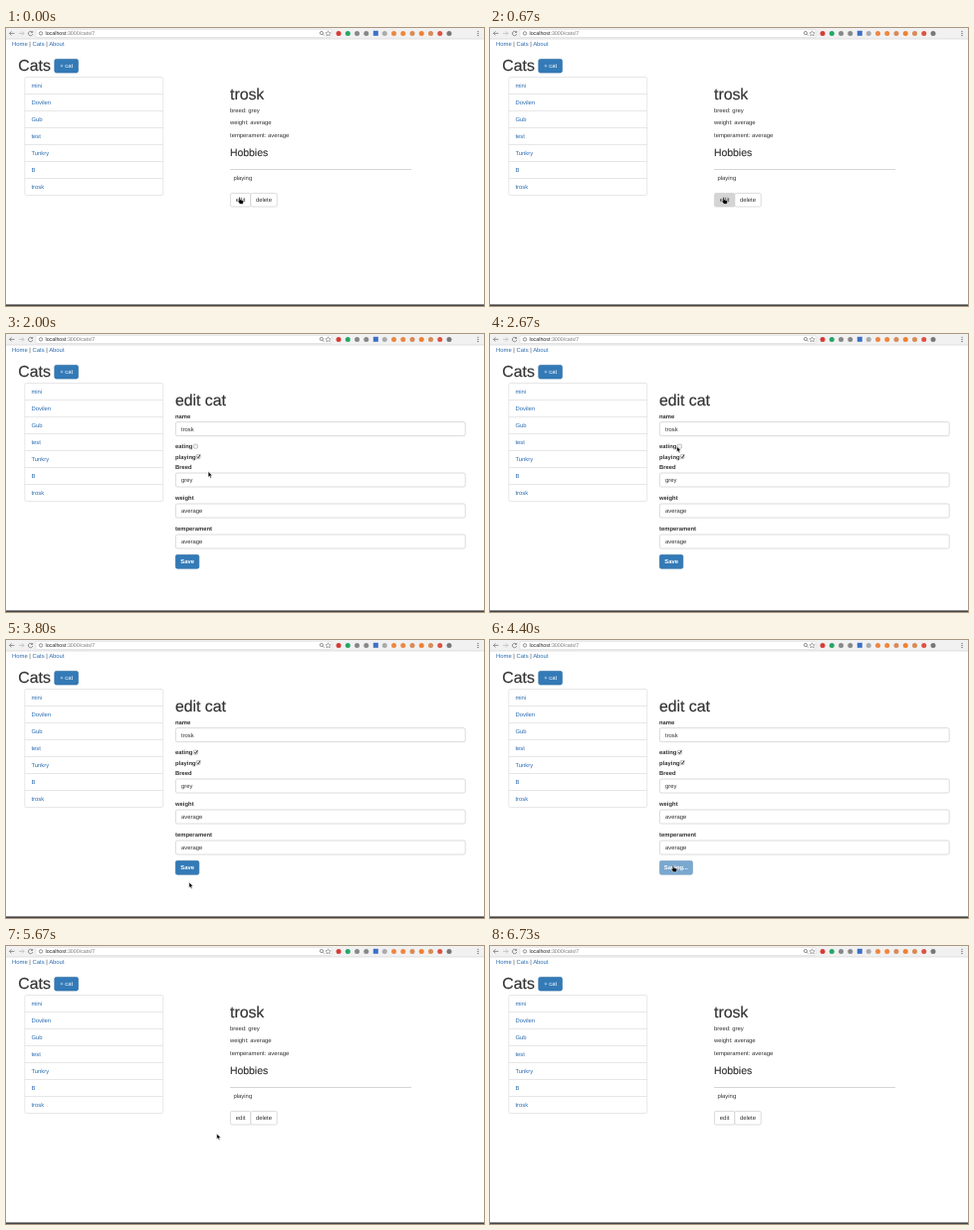
An HTML page for the animation above (6990 ms loop, 480 px wide and 280 px high).

```html
<!DOCTYPE html>
<html lang="en">
<head>
<meta charset="utf-8">
<title>Cats</title>
<style>
  html, body { margin: 0; width: 100%; height: 100%; overflow: hidden; background: #fff; }
  svg { display: block; width: 100%; height: 100%; }
  text { font: 5.9px "Liberation Sans", Arial, sans-serif; fill: #333; text-rendering: geometricPrecision; white-space: pre; }
  .link { fill: #2b6cb0; }
  .bold { font-weight: bold; }
  .white { fill: #fff; }
  .mid { text-anchor: middle; }
  .h1 { font-size: 15.8px; stroke: #333; stroke-width: .2; }
  .h3 { font-size: 10.4px; stroke: #333; stroke-width: .15; }
  .url { font-size: 5.3px; fill: #777; }
  .line { fill: none; stroke: #777; stroke-width: .8; }
</style>
</head>
<body>
<svg id="stage" viewBox="0 0 480 280"></svg>
<script>
const TICK = 1000 / 15, LOOP = 6990;
const cats = ['mini', 'Dovilen', 'Gub', 'test', 'Tunkry', 'B', 'trosk'];
const hero = cats[6];

const text = (x, y, s, cls = '', id = '') => `<text x="${x}" y="${y}" class="${cls}" id="${id}">${s}</text>`;
const rect = (x, y, w, h, fill, stroke = 'none', r = 0, id = '') =>
  `<rect x="${x}" y="${y}" width="${w}" height="${h}" rx="${r}" fill="${fill}" stroke="${stroke}" stroke-width=".7" id="${id}"/>`;
const dot = (x, y, r, fill) => `<circle cx="${x}" cy="${y}" r="${r}" fill="${fill}"/>`;
const path = (d, attrs = 'class="line"') => `<path d="${d}" ${attrs}/>`;
const group = (id, ...parts) => `<g id="${id}">${parts.join('')}</g>`;

const button = (x, y, w, h, label, cls, fill, stroke, id = '') =>
  rect(x, y, w, h, fill, stroke, 1.7, id) + text(x + w / 2, y + h / 2 + 2.1, label, 'mid ' + cls, id && id + 'Text');
const field = (label, value, y) =>
  text(170, y - 3.9, label, 'bold') + rect(170.4, y, 290.8, 14, '#fff', '#ccc', 1.7) + text(176, y + 9.2, value);
const tick = (x, y, id) => path(`M${x + 1} ${y + 2}l1 1.2 2-3.2`, `fill="none" stroke="#222" stroke-width=".9" id="${id}"`);
const check = (label, x, y, id) =>
  text(170, y + 4, label, 'bold') + rect(x, y, 4, 4, '#f4f4f4', '#aaa', .8) + tick(x, y, id);

const extensions = ['#d93a35', '#27a567', '#888', '#888', '#3d6fc4', '#aaa', '#ee8640',
  '#ee8640', '#d98a55', '#f08030', '#d98a55', '#e05040', '#777'];
const chrome = group('chrome',
  rect(0, 0, 480, 11, '#f1f1f1'),
  rect(30, 1.3, 297, 8.2, '#fff', '#ddd', 1),
  rect(0, 10.7, 480, .6, '#ccc'),
  path('M8.5 5.4h-5m2-2l-2 2 2 2'),
  path('M13 5.4h5m-2-2l2 2-2 2', 'fill="none" stroke="#bbb" stroke-width=".8"'),
  path('M26.4 4.2a2.2 2.2 0 1 0 .4 1.8m-.2-3v1.5h-1.5'),
  `<circle cx="35" cy="5.4" r="1.7" class="line"/>`,
  text(39.5, 7.3, '<tspan fill="#222">localhost</tspan>:3000/cats/7', 'url'),
  `<circle cx="316.8" cy="5" r="1.6" class="line"/>`, path('M318 6.2l1.5 1.5'),
  path('M323.5 2.8l.8 1.8 1.8.2-1.3 1.2.4 1.9-1.7-1-1.7 1 .4-1.9-1.3-1.2 1.8-.2z', 'fill="none" stroke="#777" stroke-width=".6"'),
  ...extensions.map((c, i) => i === 4 ? rect(368.8, 2.8, 5, 5, c) : dot(334 + i * 9.25, 5.4, 2.5, c)),
  ...[3.3, 5.4, 7.5].map(y => dot(474, y, .65, '#666')));

const list = group('list',
  text(6, 18, '<tspan class="link">Home</tspan> | <tspan class="link">Cats</tspan> | <tspan class="link">About</tspan>'),
  text(12.3, 42.5, 'Cats', 'h1'),
  button(48.8, 31.4, 23.6, 13.6, '+ cat', 'white', '#337ab7', '#2e6da4'),
  rect(18.8, 49.5, 139, 119, '#fff', '#ddd', 1.7),
  ...cats.map((name, i) =>
    (i ? rect(18.8, 49.2 + i * 17, 139, .7, '#ddd') : '') + text(25.4, 60.3 + i * 16.95, name, 'link')));

const show = group('show',
  text(225, 71.8, hero, 'h1'),
  text(225, 84.8, 'breed: grey'),
  text(225, 97.3, 'weight: average'),
  text(225, 109.5, 'temperament: average'),
  text(225, 129, 'Hobbies', 'h3'),
  rect(225, 142, 182, .8, '#ccc'),
  text(228.5, 152.5, 'playing'),
  button(225.4, 166.4, 20.4, 13.6, 'edit', '', '#fff', '#ccc', 'edit'),
  button(245.8, 166.4, 26.4, 13.6, 'delete', '', '#fff', '#ccc'));

const form = group('form',
  text(170, 71.8, 'edit cat', 'h1'),
  field('name', hero, 88.6),
  check('eating', 188.4, 111.2, 'eating'),
  check('playing', 191, 121.6, 'playing'),
  field('Breed', 'grey', 140),
  field('weight', 'average', 171),
  field('temperament', 'average', 202),
  button(170.4, 222.4, 23.4, 13.8, 'Save', 'white bold', '#337ab7', '#2e6da4', 'save'));

const outline = 'stroke="#fff" stroke-width=".5" fill="#000"';
const cursor = group('cursor',
  path('M0 0v5.6l1.3-1.1 1 2.1 1-.5-1-2h1.8z', outline + ' id="arrow"'),
  path('M-.6 0q.8-.6 1.2.2l.4 2.3 2.6.7q.6.3.4 1.2l-.5 2.4h-3.2l-2.2-3q.2-.9 1.3 0z', outline + ' id="hand"'),
  path('M-1.1-3.2q1.1 0 1.1.7v5q0 .7-1.1.7M1.1-3.2q-1.1 0-1.1.7v5q0 .7 1.1.7', 'fill="none" stroke="#333" stroke-width=".6" id="beam"'));

const $ = id => document.getElementById(id);
$('stage').innerHTML = rect(0, 0, 480, 280, '#fff') + chrome + list + show + form +
  rect(0, 278.4, 480, 1.6, '#444') + cursor;

// time, x, y of the pointer
const moves = [
  [0, 234.5, 170.5], [999, 234.5, 170.5], [1000, 235, 175], [1533, 235, 175],
  [2267, 189.5, 123], [2667, 187.6, 113.2], [3000, 187.8, 113], [3400, 187.8, 113],
  [3800, 183.8, 244], [4067, 183.8, 227], [4933, 183.8, 227], [5533, 211.6, 189],
  [5667, 211.6, 189], [6133, 160, 95], [6200, 160, 95], [6467, 228, 18.5],
  [6600, 228, 18.5], [6667, 228, 12], [LOOP, 228, 12]];

function pointer(t) {
  const i = moves.findIndex(m => m[0] > t);
  const [a, b] = [moves[i - 1], moves[i]];
  const k = (t - a[0]) / (b[0] - a[0]), e = k * k * (3 - 2 * k);
  return [a[1] + (b[1] - a[1]) * e, a[2] + (b[2] - a[2]) * e];
}

const display = (id, on) => $(id).style.display = on ? '' : 'none';

function draw(now) {
  const t = Math.floor((now % LOOP + 5) / TICK) * TICK + 1;
  const editing = t >= 1000 && t < 4460, saving = t >= 4395;
  display('show', !editing);
  display('form', editing);
  display('eating', t >= 3262);
  $('edit').setAttribute('fill', t < 595 || t > 1000 ? '#fff' : t < 660 ? '#ebebeb' : t < 795 ? '#d4d4d4' : '#e6e6e6');

  $('save').setAttribute('width', saving ? 33 : 23.4);
  $('save').setAttribute('opacity', saving ? .65 : 1);
  $('saveText').setAttribute('x', saving ? 186.9 : 182.1);
  $('saveText').textContent = saving ? 'Saving...' : 'Save';

  const [x, y] = pointer(t);
  const inField = editing && [88.6, 140, 171, 202].some(top => y > top && y < top + 14);
  const onButton = t < 1000 || editing && y > 222 && y < 236;
  display('beam', inField);
  display('hand', onButton);
  display('arrow', !inField && !onButton);
  display('cursor', t < 6730);
  $('cursor').setAttribute('transform', `translate(${x} ${y})`);
}

const start = performance.now();
function loop() {
  draw(performance.now() - start);
  requestAnimationFrame(loop);
}
loop();
</script>
</body>
</html>
```
